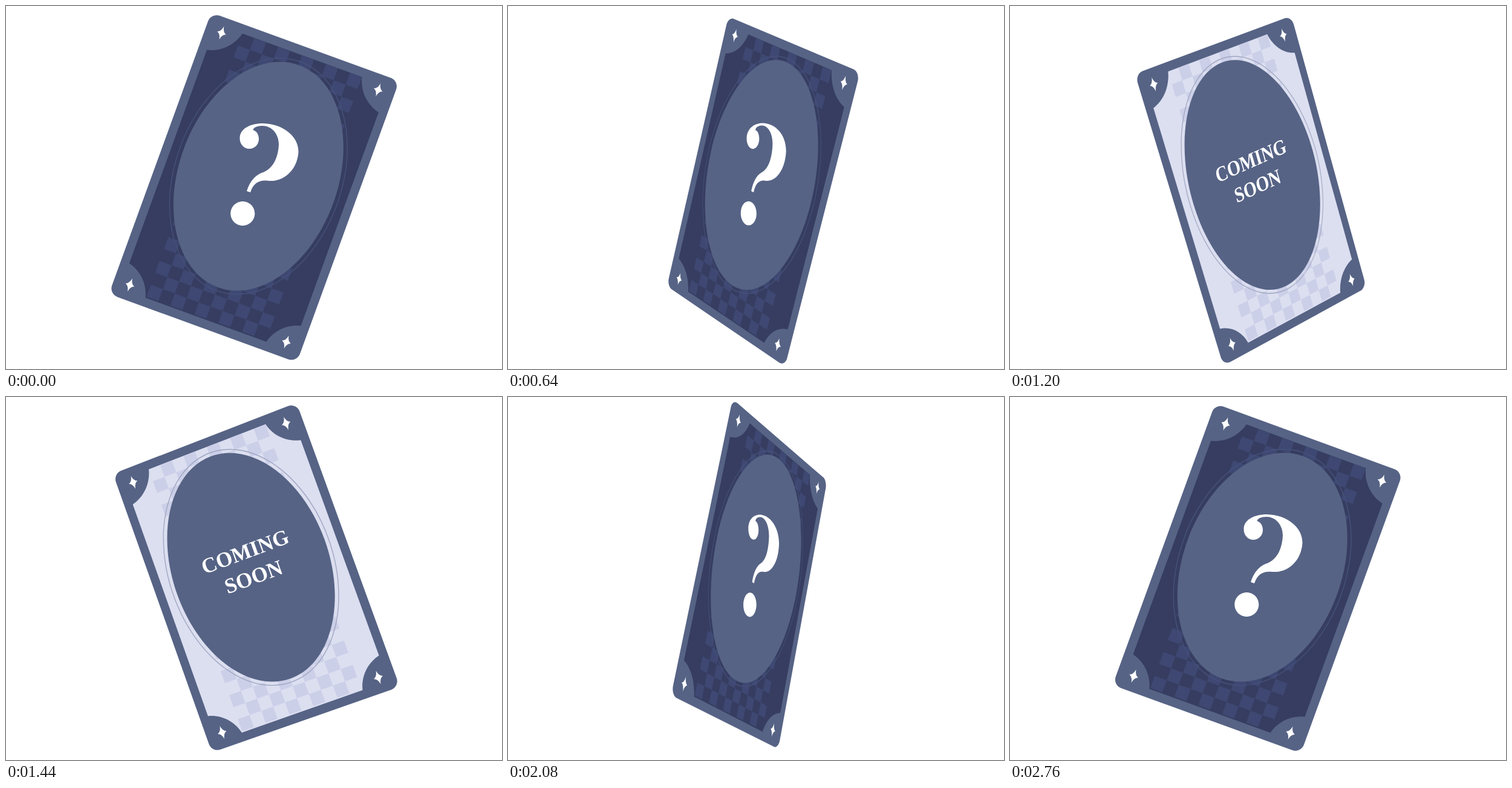
Animation of 820 by 600 pixels, one loop 2.88 s. Source, as an HTML page:

```html
<!DOCTYPE html>
<html lang="en">
<head>
<meta charset="utf-8">
<title>Turning card</title>
<style>
  html, body { margin: 0; width: 100%; height: 100%; overflow: hidden; background: #fff; }
  svg { display: block; width: 820px; height: 600px; }
  text { font: bold 35.5px "Liberation Serif", "Times New Roman", serif; fill: #fff; text-anchor: middle; }
</style>
</head>
<body>
<svg id="stage" viewBox="0 0 820 600"></svg>
<script>
const LOOP = 2880, STEP = 40, TURN = 2892, LEAD = 53;
const DEPTH = 2300, CX = 410, CY = 300, TILT = Math.PI / 9;
const HALF_W = 165.4, HALF_H = 247.4, INNER_W = 151, INNER_H = 232.7, CELL = 21.05;
const SLATE = '#566385';
const PAIR = /(-?[\d.]+) (-?[\d.]+)/g;

// Paths use absolute "x y" pairs only, so that every point can be remapped.
const remap = (d, fn) => d.replace(PAIR, (_, x, y) => fn(+x, +y).map(v => v.toFixed(2)).join(' '));
const spin = (x, y, a) => [x * Math.cos(a) - y * Math.sin(a), x * Math.sin(a) + y * Math.cos(a)];

function ellipse(cx, cy, rx, ry) {
  const kx = rx * 0.5523, ky = ry * 0.5523;
  const l = cx - rx, r = cx + rx, t = cy - ry, b = cy + ry;
  return `M${l} ${cy}C${l} ${cy - ky} ${cx - kx} ${t} ${cx} ${t}C${cx + kx} ${t} ${r} ${cy - ky} ${r} ${cy}` +
    `C${r} ${cy + ky} ${cx + kx} ${b} ${cx} ${b}C${cx - kx} ${b} ${l} ${cy + ky} ${l} ${cy}Z`;
}

function outline(w, h, r) {
  const k = r * 0.4477, a = w - r, b = h - r;
  return `M${-a} ${-h}L${a} ${-h}C${w - k} ${-h} ${w} ${k - h} ${w} ${-b}L${w} ${b}` +
    `C${w} ${h - k} ${w - k} ${h} ${a} ${h}L${-a} ${h}C${k - w} ${h} ${-w} ${h - k} ${-w} ${b}` +
    `L${-w} ${-b}C${-w} ${k - h} ${k - w} ${-h} ${-a} ${-h}Z`;
}

// Inner panel: each corner is bitten off by a circle around the card's corner.
function panel() {
  const bite = (sx, sy, flip) => {
    const r = sy < 0 ? 62 : 60.8;
    const a0 = Math.asin((HALF_W - INNER_W) / r), a1 = Math.acos((HALF_H - INNER_H) / r);
    const k = 4 / 3 * Math.tan((a1 - a0) / 4);
    const at = (a, side) => [
      sx * (HALF_W - r * (Math.sin(a) + side * Math.cos(a))),
      sy * (HALF_H - r * (Math.cos(a) - side * Math.sin(a)))].join(' ');
    const pts = [at(a0, 0), at(a0, k), at(a1, -k), at(a1, 0)];
    if (flip) pts.reverse();
    return `${pts[0]}C${pts.slice(1).join(' ')}`;
  };
  return `M${bite(-1, -1)}L${bite(1, -1, true)}L${bite(1, 1)}L${bite(-1, 1, true)}Z`;
}

function checks() {
  let d = '';
  for (let row = 0; row < 22; row++) {
    for (let col = (row + 1) % 2; col < 10; col += 2) {
      const x = (col - 5) * CELL, y = row * CELL - 232.5, r = x + CELL, b = y + CELL;
      d += `M${x} ${y}L${r} ${y}L${r} ${b}L${x} ${b}Z`;
    }
  }
  return d;
}

function stars() {
  const star = 'M0 -11.5Q1.6 -2 7.8 0Q1.6 2 0 11.5Q-1.6 2 -7.8 0Q-1.6 -2 0 -11.5Z';
  let d = '';
  for (const sx of [-1, 1]) for (const sy of [-1, 1]) {
    d += remap(star, (x, y) => [x + sx * 137.7, y + sy * 221.7]);
  }
  return d;
}

// Traced on the tilted card, then turned upright.
const mark = remap(
  'M386.5 219C386 204 402 194 425 194C458 195 483.5 215 483.5 241C482 268 462 291 434 289' +
  'C418 287 409 293 404 308L398 306C403 290 411 281 422 276C442 270 450 250 451 229' +
  'C451 210 438 198 424 198C415 198 409 201 408.5 205C415 207 418 213 418 220' +
  'C418 229 411 236 402.3 236C393.5 236 386.5 228.5 386.5 219Z' + ellipse(391.3, 343, 20, 20),
  (x, y) => spin(x - CX, y - CY, -TILT));

const stage = document.getElementById('stage');
function add(parent, tag, attrs) {
  const el = document.createElementNS('http://www.w3.org/2000/svg', tag);
  for (const name in attrs) el.setAttribute(name, attrs[name]);
  return parent.appendChild(el);
}

function face(side, ground, check, ring, sign, lines) {
  const group = add(stage, 'g', {});
  const shapes = [
    [outline(HALF_W, HALF_H, 15), SLATE],
    [panel(), ground],
    [checks(), check],
    [stars(), '#fff'],
    [ellipse(0.5, -20, 131.5, 195.5), SLATE],
    [ellipse(0.5, -20, 138.7, 202.2) + ellipse(0.5, -20, 137.3, 200.8), ring],
    [sign, '#fff']
  ].map(([d, fill]) => ({ d, el: add(group, 'path', { fill, 'fill-rule': 'evenodd' }) }));
  const texts = lines.map(([word, x, y]) => {
    const el = add(group, 'text', {});
    el.textContent = word;
    return { el, x, y };
  });
  return { side, group, shapes, texts };
}

const faces = [
  face(1, '#363d61', '#3e4872', '#46527b', mark, []),
  face(-1, '#dcdff0', '#cccfe8', '#9fa6c1', '', [['COMING', 1, -35], ['SOON', 0, 9]])
];

function draw(time) {
  const turn = Math.PI * (1 - Math.cos(Math.PI * (time + LEAD) / TURN));
  const cos = Math.cos(turn), sin = Math.sin(turn);
  for (const { side, group, shapes, texts } of faces) {
    const shown = side * cos > 0;
    group.style.display = shown ? '' : 'none';
    if (!shown) continue;
    const project = (x, y) => {
      const [px, py] = spin(side * x, y, TILT);
      const k = DEPTH / (DEPTH - px * sin);
      return [CX + px * cos * k, CY + py * k];
    };
    for (const { d, el } of shapes) el.setAttribute('d', remap(d, project));
    for (const { el, x, y } of texts) {
      const o = project(x, y), u = project(x + 1, y), v = project(x, y + 1);
      el.setAttribute('transform',
        `matrix(${[u[0] - o[0], u[1] - o[1], v[0] - o[0], v[1] - o[1], ...o].map(n => n.toFixed(5))})`);
    }
  }
}

// Poses are held for one step each.
const start = performance.now();
function tick(now) {
  const t = Math.max(0, now - start + 6) % LOOP;
  draw(Math.floor(t / STEP) * STEP);
  requestAnimationFrame(tick);
}
tick(start);
</script>
</body>
</html>
```
